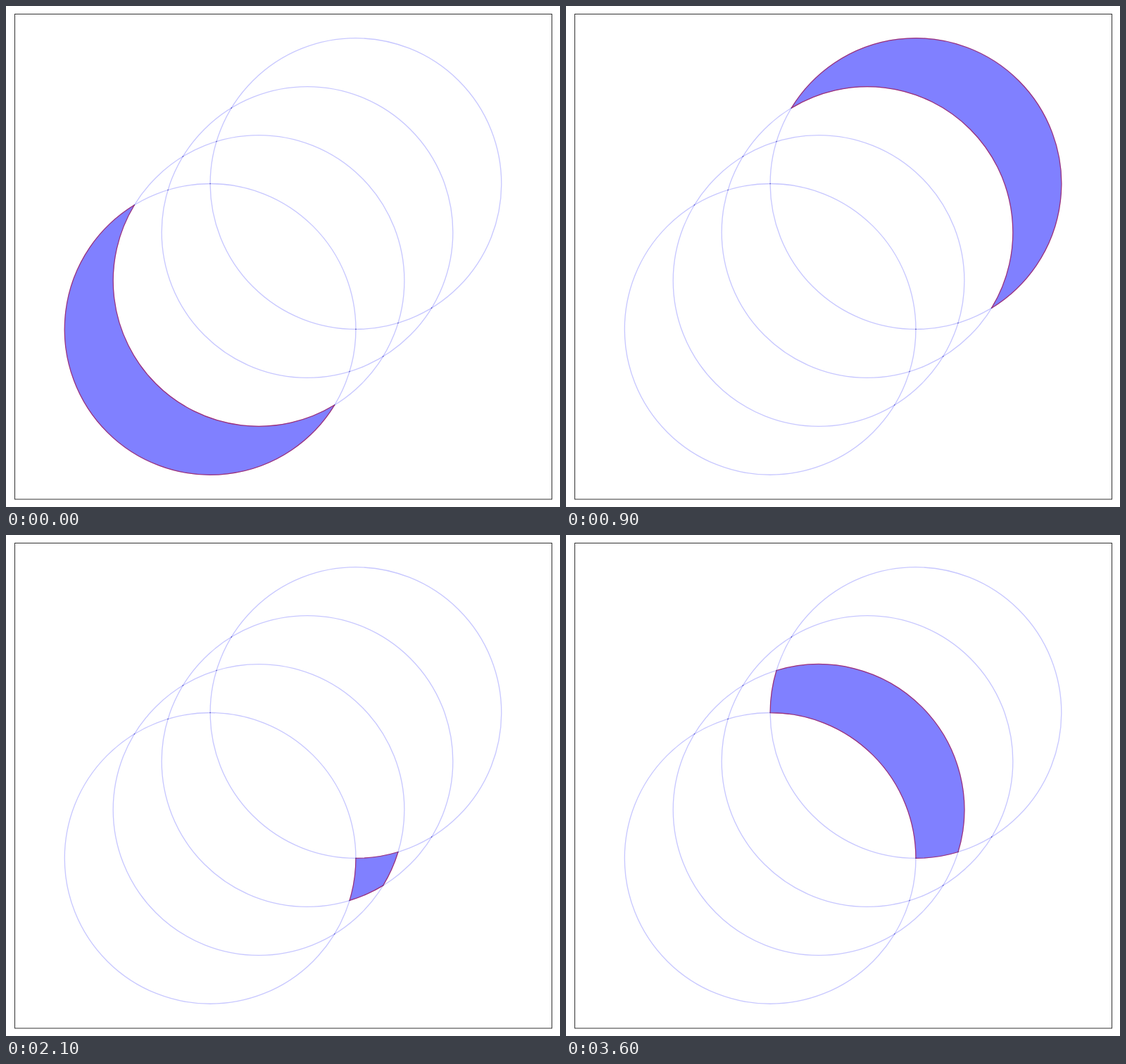
Write an HTML page that moves like this. It is 787x712 px and loops after 3900 ms.

```html
<!DOCTYPE html>
<html lang="en">
<head>
<meta charset="utf-8">
<title>Regions of four circles</title>
<style>
  html, body { margin: 0; width: 100%; height: 100%; overflow: hidden; background: #fff; }
  svg { display: block; }
</style>
</head>
<body>
<svg width="787" height="712" viewBox="0 0 787 712" fill="none">
  <rect x="12.5" y="11.5" width="763" height="689.5" stroke="#333"/>
  <g id="circles" stroke="#00f" stroke-opacity=".22" stroke-width="1.35"></g>
  <path id="region" fill="#8080ff" stroke="#9c2f78" stroke-width="1.2" stroke-linejoin="round"/>
  <g id="dots" fill="#33338c" fill-opacity=".6"></g>
</svg>
<script>
const STEP = 68.95, R = 3 * STEP, HOLD = 300;

// Corners: u/l = upper or lower crossing of two circles.
// Between corners: arc direction (+ clockwise) and circle index.
const REGIONS = [
  'u01 -0 l01 +1',
  'u03 +0 l03 +3',
  'u23 +2 l23 +3 l13 -1 u13 +3',
  'u23 +3 l23 -2',
  'u01 -1 l01 -0 l02 +2 u02 -0',
  'l01 -0 l02 -2 l12 +1',
  'u01 +1 u12 -2 u02 -0',
  'l03 -3 l13 +1 l12 +2 l02 -0',
  'u02 +0 u03 -3 l03 +0 l02 +2',
  'u02 +2 u12 +1 u13 -3 u03 -0',
  'l12 -1 l13 -3 l23 +2',
  'u12 +2 u23 -3 u13 -1',
  'u13 +1 l13 +3 l03 -0 u03 +3'
];

const center = i => [290.1 + STEP * i, 459.4 - STEP * i];

function crossing(name) {
  const [side, i, j] = name;
  const [x, y] = center((+i + +j) / 2);
  const half = (j - i) * STEP / Math.SQRT2;
  const offset = Math.sqrt((R * R - half * half) / 2) * (side === 'u' ? -1 : 1);
  return [x + offset, y + offset];
}

function arc(from, to, [dir, index]) {
  const [cx, cy] = center(+index);
  const angle = ([x, y]) => Math.atan2(y - cy, x - cx);
  const sweep = dir === '+' ? 1 : 0;
  const turn = (angle(to) - angle(from)) * (sweep ? 1 : -1);
  const full = 2 * Math.PI;
  const large = (turn + full) % full > Math.PI ? 1 : 0;
  return `A${R} ${R} 0 ${large} ${sweep} ${to}`;
}

function outline(spec) {
  const parts = spec.split(' ');
  let d = 'M' + crossing(parts[0]);
  for (let k = 0; k < parts.length; k += 2) {
    const next = parts[(k + 2) % parts.length];
    d += arc(crossing(parts[k]), crossing(next), parts[k + 1]);
  }
  return d + 'Z';
}

function addCircle(parent, [cx, cy], r) {
  const circle = document.createElementNS('http://www.w3.org/2000/svg', 'circle');
  for (const [key, value] of Object.entries({ cx, cy, r })) circle.setAttribute(key, value);
  parent.append(circle);
}

const byId = id => document.getElementById(id);
for (let i = 0; i < 4; i++) {
  addCircle(byId('circles'), center(i), R);
  for (let j = i + 1; j < 4; j++)
    for (const side of 'ul') addCircle(byId('dots'), crossing(side + i + j), 0.8);
}

const outlines = REGIONS.map(outline);
const region = byId('region');
const start = performance.now();

function draw(now) {
  const step = Math.floor(Math.max(0, now - start) / HOLD) % outlines.length;
  region.setAttribute('d', outlines[step]);
}

function frame(now) {
  draw(now);
  requestAnimationFrame(frame);
}
draw(start);
requestAnimationFrame(frame);
</script>
</body>
</html>
```
